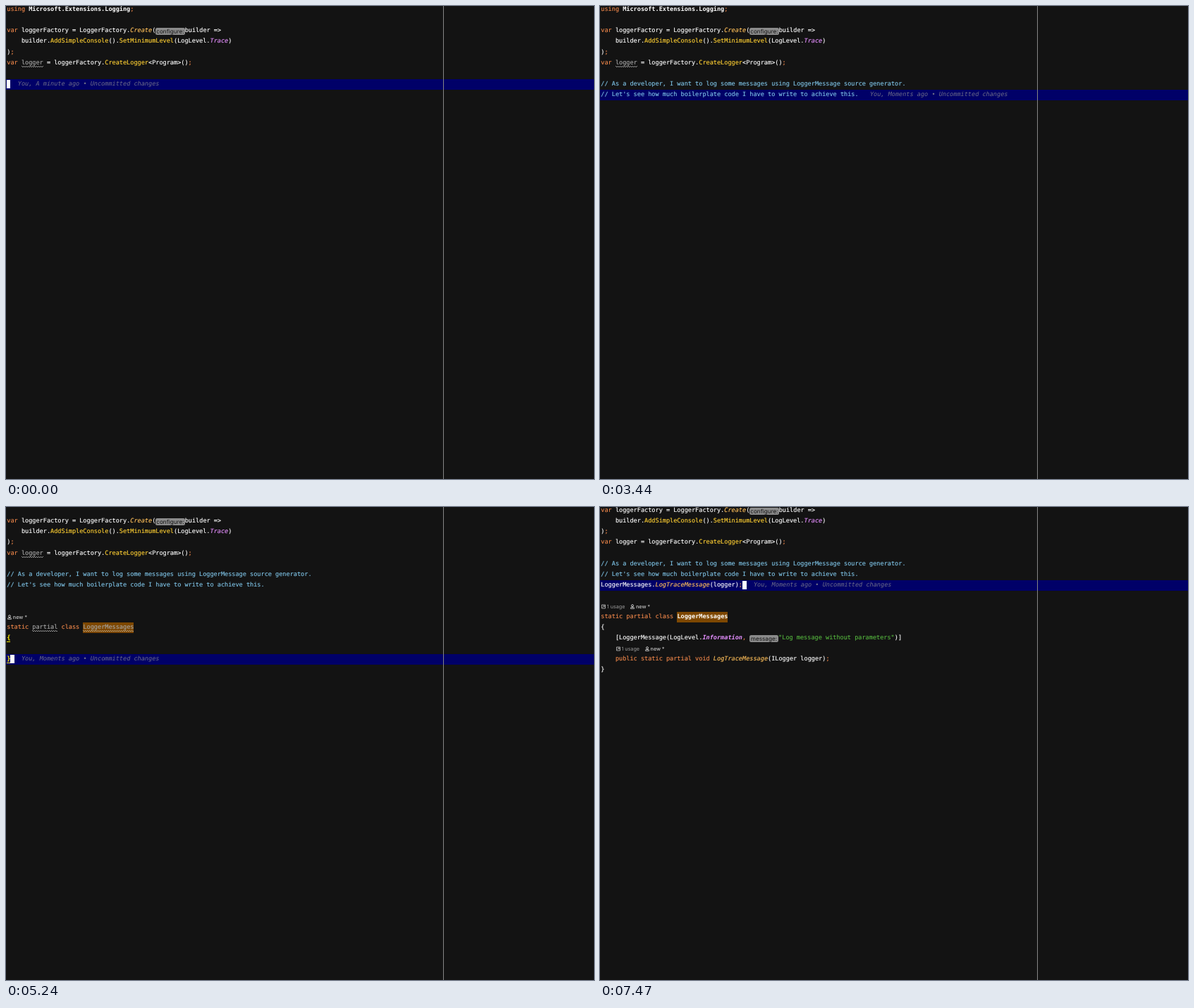
Recreate the animation shown at these times as an HTML page. Size 834x672 px, loop 8000 ms.

```html
<!DOCTYPE html>
<html lang="en">
<head>
<meta charset="utf-8">
<title>Code editor</title>
<style>
  html, body { margin: 0; width: 100%; height: 100%; overflow: hidden; background: #131313; }
  #stage { position: relative; width: 834px; height: 672px; overflow: hidden; background: #131313; --row: 15.05px; }
  #margin { position: absolute; left: 620px; top: 0; width: 1px; height: 100%; background: #858585; }
  .scene { position: absolute; inset: 0; visibility: hidden; }
  .scene.on { visibility: visible; }
  .row {
    position: absolute; left: 1.3px; height: var(--row); line-height: var(--row); white-space: pre;
    font-family: "DejaVu Sans Mono", "Noto Sans Mono", monospace; font-size: 8.566px;
    text-rendering: geometricPrecision; color: #fff; -webkit-text-stroke: .15px;
  }
  .bar { position: absolute; left: 0; width: 100%; height: 15px; background: #000068; }
  .caret { position: absolute; width: 5.2px; height: 12.4px; background: #fff; }
  .k { color: #ed864a; }
  .m { color: #ffcf33; }
  .s { color: #ffbf5a; font-style: italic; }
  .e { color: #e58fff; font-style: italic; }
  .c { color: #7ec3e6; }
  .t { color: #54b33e; }
  .u { color: #a5a5a5; }
  .i { font-style: italic; }
  .b { font-weight: bold; -webkit-text-stroke: 0; }
  .blame { color: #6e6e88; font-style: italic; -webkit-text-stroke: 0; }
  .mark { display: inline-block; height: 15px; background: #7d4700; }
  .brace { color: #ffec00; font-weight: bold; box-shadow: 0 1px #ffec00; }
  .wave, .err { position: relative; }
  .wave::after, .err::after {
    content: ""; position: absolute; left: 0; right: 0; bottom: -1px; height: 2px; --ink: #929292;
    background:
      repeating-linear-gradient(90deg, var(--ink) 0 1.4px, transparent 1.4px 3px) 0 0 / 100% 1px no-repeat,
      repeating-linear-gradient(90deg, transparent 0 1.4px, var(--ink) 1.4px 3px) 0 1px / 100% 1px no-repeat;
  }
  .mark .wave::after { --ink: #b29b7c; }
  .err::after { --ink: #ff2d3f; }
  .hint {
    display: inline-block; box-sizing: border-box; height: 10px; line-height: 10px; vertical-align: -2px;
    padding: 0 1px; border-radius: 2.5px; background: #8b8b8b; color: #151515; text-align: center;
    font-family: Inter, Arial, sans-serif; font-size: 8.2px; -webkit-text-stroke: 0;
  }
  .lens { font-family: Inter, Arial, sans-serif; font-size: 7.2px; color: #9c9c9c; -webkit-text-stroke: 0; }
  .lens svg { width: 6px; height: 7px; margin: 0 1.8px 0 .7px; vertical-align: -1px; fill: none; stroke: #c4c4c4; }
  .lens b { font-weight: 600; color: #b4b4b4; }
  .lens .used { margin-right: 7px; }
</style>
</head>
<body>
<div id="stage"><div id="margin"></div></div>
<script>
const LOOP = 8000, ROW = 15.05, COL = 5.157, TOP = -1.7, LEFT = 1.3;
const stage = document.getElementById('stage');

const tag = (cls, text) => `<span class="${cls}">${text}</span>`;
const k = s => tag('k', s);
const hint = (text, width) => `<span class="hint" style="width:${width}px">${text}</span>`;
const semi = k(';');

// Code lines
const logger = name => `${k('var')} ${name} = loggerFactory.${tag('m', 'CreateLogger')}&lt;Program&gt;()${semi}`;
const intro = used => [
  `${k('using')} ${tag('b', 'Microsoft.Extensions.Logging')}${semi}`,
  '',
  `${k('var')} loggerFactory = LoggerFactory.${tag('s', 'Create')}(${hint('configure:', 41.4)}builder =&gt;`,
  `    builder.${tag('m', 'AddSimpleConsole')}().${tag('m', 'SetMinimumLevel')}(LogLevel.${tag('e', 'Trace')})`,
  `)${semi}`,
  logger(used ? 'logger' : tag('u wave', 'logger')),
  ''
];
const note1 = tag('c', '// As a developer, I want to log some messages using LoggerMessage source generator.');
const note2 = tag('c', "// Let's see how much boilerplate code I have to write to achieve this.");
const notes = [note1, note2];

const plainName = 'LoggerMessages';
const idleName = tag('mark', tag('u wave', plainName));
const usedName = tag('mark', tag('b', plainName));
const idlePartial = tag('u wave', 'partial');
const classLine = (name, partial = k('partial')) => `${k('static')} ${partial} ${k('class')} ${name}`;

const attribute = label =>
  `    [LoggerMessage(LogLevel.${tag('e b', 'Information')}${k(',')} ${label}${tag('t', '"Log message without parameters"')})]`;
const labelled = attribute(hint('message:', 40.2) + '<span style="margin-left:.6px"></span>');
const method = name => `    ${k('public static partial void')} ${name}(ILogger logger)${semi}`;
const trace = cls => tag(cls, 'LogTraceMessage');
const call = name => `LoggerMessages.${name}(logger)${semi}`;

// Code lens above a declaration
const person = '<svg viewBox="0 0 6 7"><circle cx="3" cy="2.2" r="1.5"/><path d="M.5 6.3V5.5Q.5 4.5 1.6 4.5H4.4Q5.5 4.5 5.5 5.5V6.3Z"/></svg>';
const arrow = '<svg viewBox="0 0 6 7" stroke-width=".8"><path d="M.5 1H5.5V6H.5ZM1.8 4.7 4.2 2.3M2.4 2.3H4.2V4.1"/></svg>';
const lens = (indent, used) => '    '.slice(4 - indent) +
  tag('lens', (used ? tag('used', arrow + '1 usage') : '') + person + '<b>new *</b>');

const brace = s => tag('brace', s);
const openPair = [brace('{'), '', brace('}')];
const idleClass = classLine(idleName, idlePartial);
const early = [...intro(), ...notes, '', ''];
const withLens = [...early, lens(0)];
const body = (name, used, cls = idleName) =>
  [lens(0, used), classLine(cls), '{', labelled, lens(4, used), method(name), '}'];
const late = (line, used, ...rest) => [...intro(used), ...notes, line, '', ...body(...rest)];

// [start, lines, hidden lines at the top, caret row, caret column, caret shown, age]
const scenes = [
  [0, intro(), 0, 7, 0, true, 'A minute'],
  [440, [...intro(), note1], 0, 7, 84],
  [1490, [...intro(), note1], 0, 7, 84, false],
  [1940, [...intro(), note1], 0, 8, 0],
  [2240, [...intro(), ...notes], 0, 8, 71],
  [3440, [...intro(), ...notes], 0, 8, 71, false],
  [3890, early, 0, 9, 0],
  [4190, early, 0, 10, 0],
  [4490, early, 0, 11, 0],
  [4790, [...early, classLine(plainName), '{', '', '}'], 0, 14, 1],
  [4940, [...early, idleClass, ...openPair], 0, 14, 1],
  [5240, [...withLens, idleClass, ...openPair], 1, 14, 1],
  [5690, [...withLens, idleClass, ...openPair], 1, 13, 0],
  [5840, [...withLens, idleClass, '{', '', '}'], 1, 13, 0],
  [5990, [...withLens, classLine(idleName), '{', attribute(''), method(trace('s')), '}'], 1, 14, 63],
  [6140, [...withLens, classLine(idleName), '{', labelled, method(trace('u i err')), '}'], 1, 14, 63],
  [6290, late('', false, trace('u i err')), 2, 14, 63],
  [6880, late('', false, trace('u i err')), 2, 7, 0],
  [7030, late('', false, trace('u i wave')), 2, 7, 0],
  [7170, late(call('LogTraceMessage'), false, trace('u i wave')), 2, 7, 39],
  [7320, late(call(trace('s')), true, trace('s'), false, usedName), 2, 7, 39],
  [7470, late(call(trace('s')), true, trace('s'), true, usedName), 2, 7, 39]
];

const box = (cls, row, left, html = '', dy = 0) =>
  `<div class="${cls}" style="top:${(TOP + row * ROW + dy).toFixed(2)}px;left:${left}px">${html}</div>`;

const views = scenes.map(([, lines, skip, row, col, shown = true, age = 'Moments']) => {
  const view = document.createElement('div');
  const x = LEFT + col * COL;
  view.className = 'scene';
  view.innerHTML = box('bar', row, 0) +
    lines.slice(skip).map((line, i) => line && box('row', i, LEFT, line)).join('') +
    box('row blame', row, x + 3 * COL, `You, ${age} ago • Uncommitted changes`) +
    (shown ? box('caret', row, x, '', .9) : '');
  stage.insertBefore(view, stage.lastElementChild);
  return view;
});

let current = -1;
function draw(now) {
  const t = now % LOOP;
  const next = scenes.findLastIndex(scene => scene[0] <= t);
  if (next !== current) {
    views.forEach((view, i) => view.classList.toggle('on', i === next));
    current = next;
  }
  requestAnimationFrame(() => draw(performance.now()));
}
draw(0);
</script>
</body>
</html>
```
